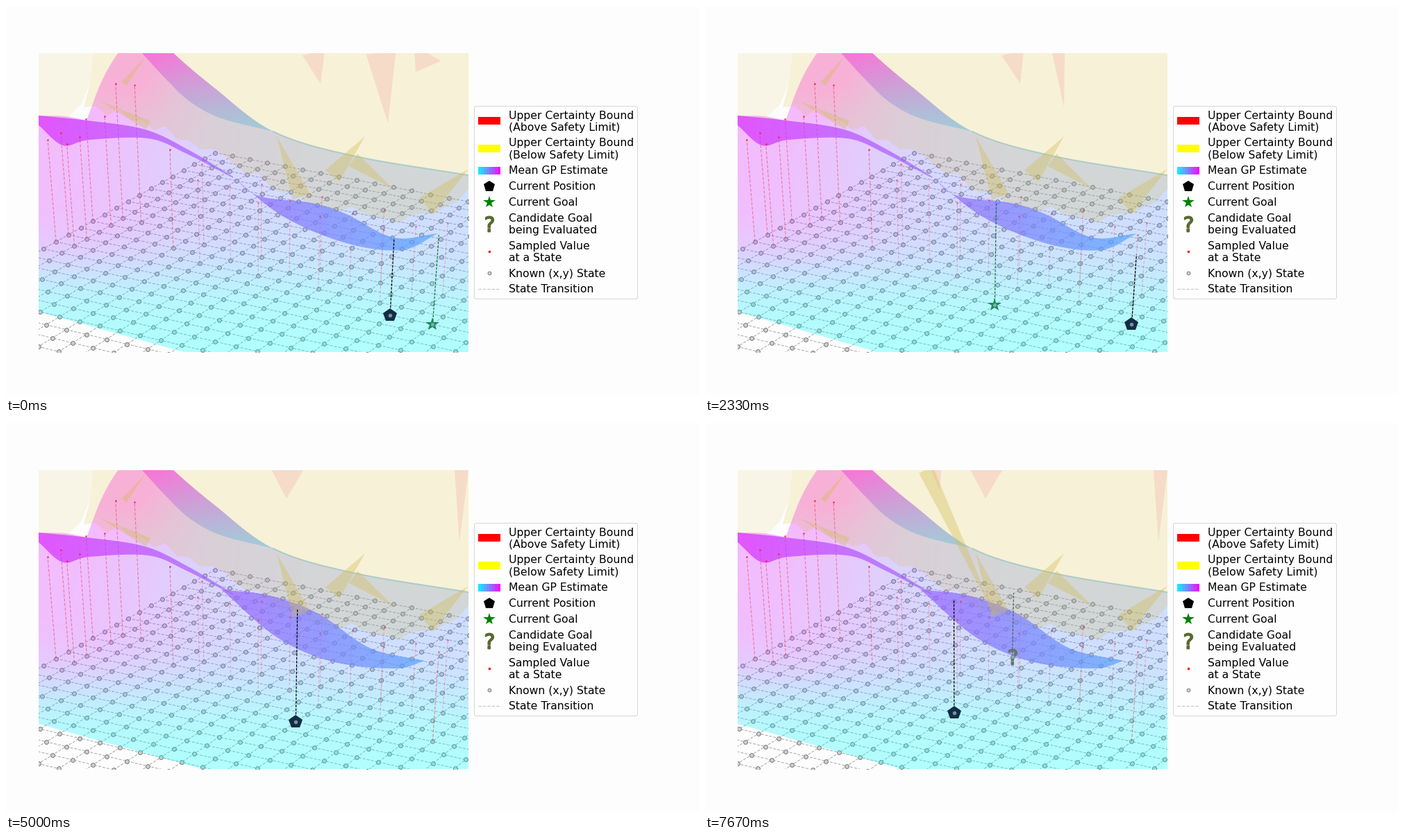
These frames come from a looping animation (998x561 px, 8000 ms). A matplotlib script:

```python
from itertools import product

import numpy as np
import matplotlib.pyplot as plt
from matplotlib.animation import FuncAnimation
from matplotlib.patches import FancyBboxPatch, Polygon, Rectangle

W, H, DPI = 998, 561, 64
FRAMES, INTERVAL = 80, 100
PX = 72 / DPI  # points per pixel
X0, X1, Y0, Y1 = 47, 666, 67.5, 499

plt.rcParams["font.family"] = "DejaVu Sans"
fig = plt.figure(figsize=(W / DPI, H / DPI), dpi=DPI, facecolor="#fdfdfd")


def pixel_axes(left, right, top, bottom):
    ax = fig.add_axes([left / W, 1 - bottom / H, (right - left) / W, (bottom - top) / H])
    ax.set(xlim=(left, right), ylim=(bottom, top), autoscale_on=False)
    ax.axis("off")
    return ax


page = pixel_axes(0, W, 0, H)
scene = pixel_axes(X0, X1, Y0, Y1)


# ---- drawing helpers ----
def smooth(*points, steps=10):
    """Catmull-Rom curve through a few key points."""
    p = np.array(points, float)
    p = np.vstack([2 * p[0] - p[1], p, 2 * p[-1] - p[-2]])
    t = np.linspace(0, 1, steps, endpoint=False)[:, None]
    spans = [b + t / 2 * (c - a + t * (2 * a - 5 * b + 4 * c - d + t * (3 * (b - c) + d - a)))
             for a, b, c, d in zip(p, p[1:], p[2:], p[3:])]
    return np.vstack(spans + [p[-2:-1]])


def flat(points, color, alpha, z):
    return scene.add_patch(Polygon(points, fc=color, ec="none", alpha=alpha, zorder=z))


def shaded(points, level, alpha, z):
    """Polygon coloured with the cool map from level(x, y)."""
    (xa, ya), (xb, yb) = np.min(points, 0), np.max(points, 0)
    gx, gy = np.meshgrid(np.linspace(xa, xb, 120), np.linspace(ya, yb, 120))
    image = scene.imshow(level(gx, gy), cmap="cool", vmin=0, vmax=1, alpha=alpha, zorder=z,
                         extent=(xa, xb, yb, ya), aspect="auto", interpolation="bilinear")
    image.set_clip_path(Polygon(points, transform=scene.transData))
    scene.set(xlim=(X0, X1), ylim=(Y1, Y0))
    return image


def strip(upper, lower, level, alpha, z):
    return shaded(np.vstack([upper, lower[::-1]]), level, alpha, z)


def spike(tip, base, width, color="#d2bc50", alpha=0.36, z=7):
    """Thin triangle pointing from the middle of its base to its tip."""
    tip, base = np.array(tip, float), np.array(base, float)
    dx, dy = (tip - base) / np.hypot(*(tip - base))
    side = np.array([-dy, dx]) * width / 2
    return flat([tip, base + side, base - side], color, alpha, z)


# ---- ground lattice in perspective, fitted to a few known nodes ----
KNOWN = [(0, 0, 417, 431), (-2, 0, 359, 418), (2, 1, 493, 432.5), (4, 1, 553, 446),
         (6, 1, 614, 460), (-3, 7, 443.5, 336), (-13, 1, 72, 340), (-13, 15, 301, 212)]
rows = [row for u, v, x, y in KNOWN
        for row in ([u, v, 1, 0, 0, 0, -u * x, -v * x], [0, 0, 0, u, v, 1, -u * y, -v * y])]
rhs = [value for *_, x, y in KNOWN for value in (x, y)]
fit = np.linalg.lstsq(np.array(rows, float), np.array(rhs, float), rcond=None)[0]
HOMOGRAPHY = np.append(fit, 1).reshape(3, 3)


def project(u, v):
    u, v = np.asarray(u, float), np.asarray(v, float)
    x, y, w = np.tensordot(HOMOGRAPHY, np.array([u, v, np.ones_like(u)]), 1)
    return x / w, y / w


def stem_line(x, y, height):
    """Verticals spread slightly away from the middle of the view."""
    return [x, x + (x - 365) / 3600 * height], [y, y - height]


gx, gy = project(*np.meshgrid(np.arange(-13, 17), np.arange(-14, 16)))
for xs, ys in ((gx, gy), (gx.T, gy.T)):
    scene.plot(xs, ys, color="#a8a8a8", lw=1.0 * PX, dashes=(4, 2), zorder=1)
scene.plot(gx.ravel(), gy.ravel(), "o", ms=5.8 * PX, mfc="#cfcfcf", mec="#707070",
           mew=0.9 * PX, zorder=2)


# ---- surfaces ----
def mean_level(x, y):
    level = 0.42 + 0.43 * np.exp(-((x - X0) / 220) ** 2)
    fade = 1 / (1 + np.exp((y - 375 - 0.04 * x) / 26))
    peak = 0.4 * np.exp(-((x - 180) / 80) ** 2 - ((y - 80) / 70) ** 2)
    return np.clip(level * fade + peak, 0, 1)


def fold_level(x, y):
    return 0.3 + 0.55 * (X1 - x) / (X1 - X0)


def slope_level(x, y):
    return np.clip(1 - 0.8 * (y - Y0) / 115, 0, 1)


RIDGE = smooth((205, 30), (240, 67), (300, 118), (385, 181), (500, 216), (666, 244))
CREST = np.vstack([smooth((47, 158), (85, 159), (116, 165)),
                   smooth((116, 165), (138, 108), (162, 67), (190, 35)), RIDGE])

strip(RIDGE[10:31], smooth((195, 67), (230, 105), (265, 138), (310, 162), (385, 181)),
      slope_level, 0.4, 4)
strip(smooth((47, 158), (116, 165), (200, 178), (262, 207), (327, 246)),
      smooth((47, 172), (82, 201), (120, 193), (205, 191), (260, 213), (327, 248)),
      fold_level, 0.68, 6)
scene.plot(*RIDGE[30:].T, color="#6cb4b4", alpha=0.45, lw=2 * PX, zorder=6)

# translucent upper bound with a ragged lower edge
rng = np.random.default_rng(4)
edge_x = np.linspace(112, X1, 34)
edge_y = np.interp(edge_x, [112, 240, 300, 430, 540, 610, 666],
                   [138, 183, 208, 280, 306, 304, 262]) + rng.uniform(-9, 9, edge_x.size)
flat([(126, 67), (121, 112), *zip(edge_x, edge_y), (X1, Y0)], "#dab61e", 0.17, 5)
flat([(47, 67), (126, 67), (121, 112), (108, 142), (82, 168), (47, 158)], "#dab61e", 0.1, 5)
for tip, base, width in [((390, 188), (425, 275), 26), ((517, 188), (470, 245), 26),
                         ((558, 264), (500, 222), 22), ((666, 235), (605, 288), 30),
                         ((202, 72), (170, 112), 9), ((135, 137), (205, 172), 14)]:
    spike(tip, base, width)


# ---- sampled values ----
def sample(u, v, height):
    x, y = project(u, v)
    xs, ys = stem_line(x, y, height)
    bold = x < 260
    stem, = scene.plot(xs, ys, color="#f02848", alpha=0.5 if bold else 0.3, lw=1.1 * PX,
                       dashes=(4, 2), zorder=5)
    dot, = scene.plot(xs[1], ys[1], "o", color="#ee2030", ms=2.6 * PX, mew=0,
                      alpha=0.85 if bold else 0.6, zorder=8)
    return stem, dot


def sampled_height(x):
    return 105 + 42 / (1 + np.exp((x - 270) / 15)) + 70 * np.exp(-((x - 182) / 22) ** 2)


cluster = list(product((-13, -12), (1, 2, 4))) + [(-12, 5), (-11, 5)]
trail = [(k - 8, 3 + round(1.6 * np.sin(2.1 * k))) for k in range(14)]
for u, v in cluster + trail:
    sample(u, v, sampled_height(project(u, v)[0]))
goal_sample = sample(6, 1, 129)
late_sample = sample(6, 1, 101)

# ---- stages of the estimate ----
EARLY_FOLD = (smooth((327, 247), (364, 274), (440, 284), (490, 300), (558, 334), (622, 328)),
              smooth((327, 247), (400, 304), (490, 342), (570, 352), (622, 328)))
LATE_FOLD = (smooth((310, 240), (380, 249), (450, 275), (525, 325), (603, 343)),
             smooth((310, 240), (390, 309), (470, 344), (560, 354), (603, 343)))
LATE_PINK = [(404, 109, 405, 46), (653, 172, 656, 20)]


def stage(bottom_x, left_y, fold, pink):
    outline = [*CREST, (X1, Y1), (bottom_x, Y1), (X0, left_y)]
    parts = [shaded(outline, mean_level, 0.3, 3), strip(*fold, fold_level, 0.72, 6)]
    return parts + [spike((x, y), (base, Y0), width, "#f5b0ac", 0.33, 6)
                    for x, y, base, width in pink]


STAGES = [
    stage(256, 441, EARLY_FOLD, [(453, 112, 443, 33), (550, 169, 540, 43), (590, 95, 607, 45)]),
    stage(248, 441, EARLY_FOLD, [(454, 112, 443, 33), (517, 146, 509, 18)]),
    stage(283, 434, LATE_FOLD, LATE_PINK),
    stage(283, 434, LATE_FOLD, LATE_PINK + [(338, 98, 333, 15)]),
]
STAGES[3].append(spike((420, 283), (318, Y0), 22))

# ---- agent, goal and candidate ----
QUERY = dict(marker="$?$", ms=22 * PX, mew=1.8 * PX)


class Pin:
    """Marker on the ground with a dashed stem up to the surface."""

    def __init__(self, color, stem_color, **marker):
        self.stem, = scene.plot([], [], color=stem_color, lw=1.2 * PX, dashes=(3, 1.4), zorder=9)
        self.mark, = scene.plot([], [], color=color, ls="", zorder=10, **marker)
        self.hub, = scene.plot([], [], "o", mfc="#a6c0cc", mec="#7896a4", alpha=0.7,
                               ms=5 * PX, mew=0.8 * PX, zorder=11)

    def place(self, node, height=0):
        for part in (self.stem, self.mark, self.hub):
            part.set_visible(node is not None)
        if node is not None:
            x, y = project(*node)
            self.stem.set_data(*stem_line(x, y, height))
            self.mark.set_data([x], [y])
            self.hub.set_data([x], [y])


agent = Pin("#122d44", "black", marker="p", ms=20 * PX, mew=0)
goal = Pin("#128c58", "#0f7832", marker="*", ms=21 * PX, mew=0)
candidate = Pin("#68746f", "#556058", **QUERY)

ROUTE = [(4, 1), (5, 1)] + [(u, 1) for u in range(6, -1, -1)] + [(0, 0), (-1, 0), (-2, 0)]
LEGS = [(0, 2), (7, 14), (19, 21), (26, 26)]  # step of goal reveal, step of arrival
FAR_NODE, FAR_HEIGHT = (-3, 7), 92


def walked(i):
    return sum(int(np.clip(i, reveal, arrive)) - reveal for reveal, arrive in LEGS)


def surface_height(node, current):
    at_end, slope = [(129, -0.31), (101, 0.235), (118, 0.235), (118, 0.235)][current]
    return min(at_end + slope * (614 - project(*node)[0]), 162)


def update(frame):
    # Three steps a second; the lead rounds each change to a whole frame.
    i = (frame * INTERVAL + 70) * 3 // 1000
    current = sum(i > arrive for _, arrive in LEGS)
    for k, parts in enumerate(STAGES):
        for part in parts:
            part.set_visible(k == current)

    here = ROUTE[walked(i)]
    agent.place(here, surface_height(here, current))
    reveal, arrive = LEGS[current]
    target = ROUTE[walked(arrive)]
    height = surface_height(target, current)
    goal.place(target if reveal <= i < arrive else None, height)
    if i == reveal - 3:
        candidate.place(FAR_NODE, FAR_HEIGHT)
    else:
        candidate.place(target if reveal - 3 < i < reveal else None, height)

    for part in goal_sample:
        part.set_visible(current > 0)
    for part in late_sample:
        part.set_visible(i > LEGS[1][0])
    return []


# ---- legend ----
def bar(color, y, x=680.5, width=31.5):
    page.add_patch(Rectangle((x, y - 5.5), width, 11, fc=color, ec="none"))


def cool_bar(y):
    for k in range(8):
        bar(plt.cm.cool(0.1 + k / 8.5), y, 680.5 + 3.94 * k, 3.94)


def symbol(y, **style):
    page.plot(696.5, y, ls="", **style)


LEGEND = [
    ("Upper Certainty Bound\n(Above Safety Limit)", lambda y: bar("red", y)),
    ("Upper Certainty Bound\n(Below Safety Limit)", lambda y: bar("yellow", y)),
    ("Mean GP Estimate", cool_bar),
    ("Current Position", lambda y: symbol(y, marker="p", color="black", ms=16.5 * PX, mew=0)),
    ("Current Goal", lambda y: symbol(y, marker="*", color="green", ms=18.5 * PX, mew=0)),
    ("Candidate Goal\nbeing Evaluated", lambda y: symbol(y, color="darkolivegreen", **QUERY)),
    ("Sampled Value\nat a State", lambda y: symbol(y, marker="o", color="red", ms=3.6 * PX, mew=0)),
    ("Known (x,y) State", lambda y: symbol(y, marker="o", mfc="#d0d0d0", mec="#808080",
                                           ms=4.8 * PX, mew=PX)),
    ("State Transition", lambda y: page.plot([680.5, 712], [y, y], color="#c4c4c4", lw=1.1 * PX,
                                             dashes=(4, 1.8))),
]
page.add_patch(FancyBboxPatch((677, 147), 230, 273, boxstyle="round,pad=2.5,rounding_size=3",
                              fc="#fefefe", ec="#d6d6d6", lw=PX))
baseline, LINE, GAP = 162.5, 17.1, 22.8
for label, draw_handle in LEGEND:
    lines = label.split("\n")
    draw_handle(baseline + LINE * (len(lines) - 1) / 2 - 5.3)
    for k, text in enumerate(lines):
        page.text(724, baseline + LINE * k, text, size=15.6 * PX, va="baseline")
    baseline += LINE * (len(lines) - 1) + GAP

anim = FuncAnimation(fig, update, frames=FRAMES, interval=INTERVAL, repeat=True,
                     repeat_delay=0, blit=False)
plt.show()
```
